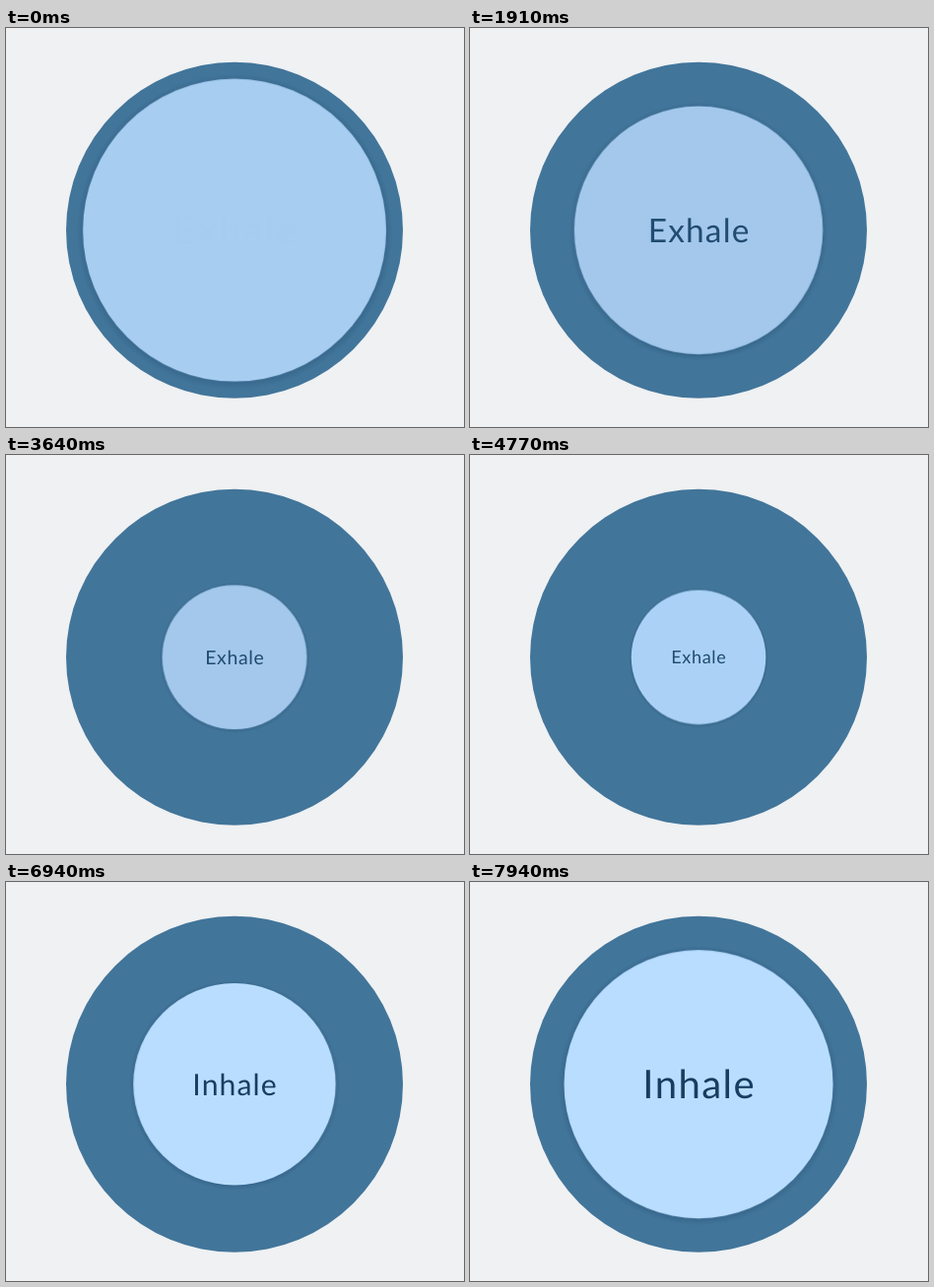
An HTML page that plays this animation: 465x406 px, repeating every 8 s.

```html
<!DOCTYPE html>
<html lang="en">
<head>
<meta charset="utf-8">
<title>Breathing</title>
<style>
  html, body { margin: 0; height: 100%; overflow: hidden; background: #eff1f3; }
  svg { display: block; width: 465px; height: 406px; }
  text {
    font-family: Lato, "Open Sans", sans-serif;
    letter-spacing: .035em;
    text-anchor: middle;
    text-rendering: geometricPrecision;
    opacity: 0;
  }
  #exhale { font-size: 26.5px; fill: #214b70; }
  #inhale { font-size: 29.4px; fill: #173d60; }
</style>
</head>
<body>
<svg viewBox="0 0 465 406">
  <defs>
    <radialGradient id="shade">
      <stop offset=".94" stop-color="#1c4468" stop-opacity=".42"/>
      <stop offset=".97" stop-color="#1c4468" stop-opacity=".16"/>
      <stop offset="1" stop-color="#1c4468" stop-opacity="0"/>
    </radialGradient>
  </defs>
  <g transform="translate(232 205.8)">
    <circle r="171" fill="#42759a"/>
    <!-- the ball is drawn with a radius of 100 and scaled -->
    <g id="ball">
      <circle cy="1" r="104" fill="url(#shade)"/>
      <circle id="disc" r="100" fill="#a3c8ec"/>
      <text id="exhale" x=".5" y="9.5">Exhale</text>
      <text id="inhale" x=".5" y="10.5">Inhale</text>
    </g>
  </g>
</svg>
<script>
  const LOOP = 8000;

  // steps: [time in ms, value, easing to the next step]
  function play(id, prop, steps) {
    const frames = steps.map(([time, value, easing = 'linear']) =>
      ({ offset: time / LOOP, [prop]: value, easing }));
    document.getElementById(id).animate(frames, { duration: LOOP, iterations: Infinity });
  }

  const size = r => `scale(${r / 100})`;
  const BIG = 154, SMALL = 68.3, BREATH = 4000;
  const out = 330, into = 5175;

  // share of the second breath that fits before the loop restarts
  const LAST = 138.3;
  const inhaleSteps = [[0, 0], [.1, .0197], [.2, .0817], [.3, .187], [.4, .332], [.5, .5], [.6, .668]]
    .map(([p, v]) => [into + p * BREATH, size(SMALL + v * (BIG - SMALL))]);

  play('ball', 'transform', [
    [0, size(BIG)],
    [out, size(BIG), 'ease-in-out'],
    [out + BREATH, size(SMALL)],
    ...inhaleSteps,
    [LOOP, size(LAST)]
  ]);

  play('disc', 'fill', [
    [0, '#a7cdf1'], [180, '#a3c8ec'],
    [4470, '#a3c8ec', 'ease-in'], [4770, '#abd2f6', 'ease-out'],
    [5060, '#b9ddff'], [LOOP, '#b9ddff']
  ]);

  play('exhale', 'opacity', [
    [0, 0], [180, 1], [4800, 1], [4800, 0], [LOOP, 0]
  ]);

  play('inhale', 'opacity', [
    [0, 0], [4850, 0], [5060, 1], [LOOP, 1]
  ]);
</script>
</body>
</html>
```
